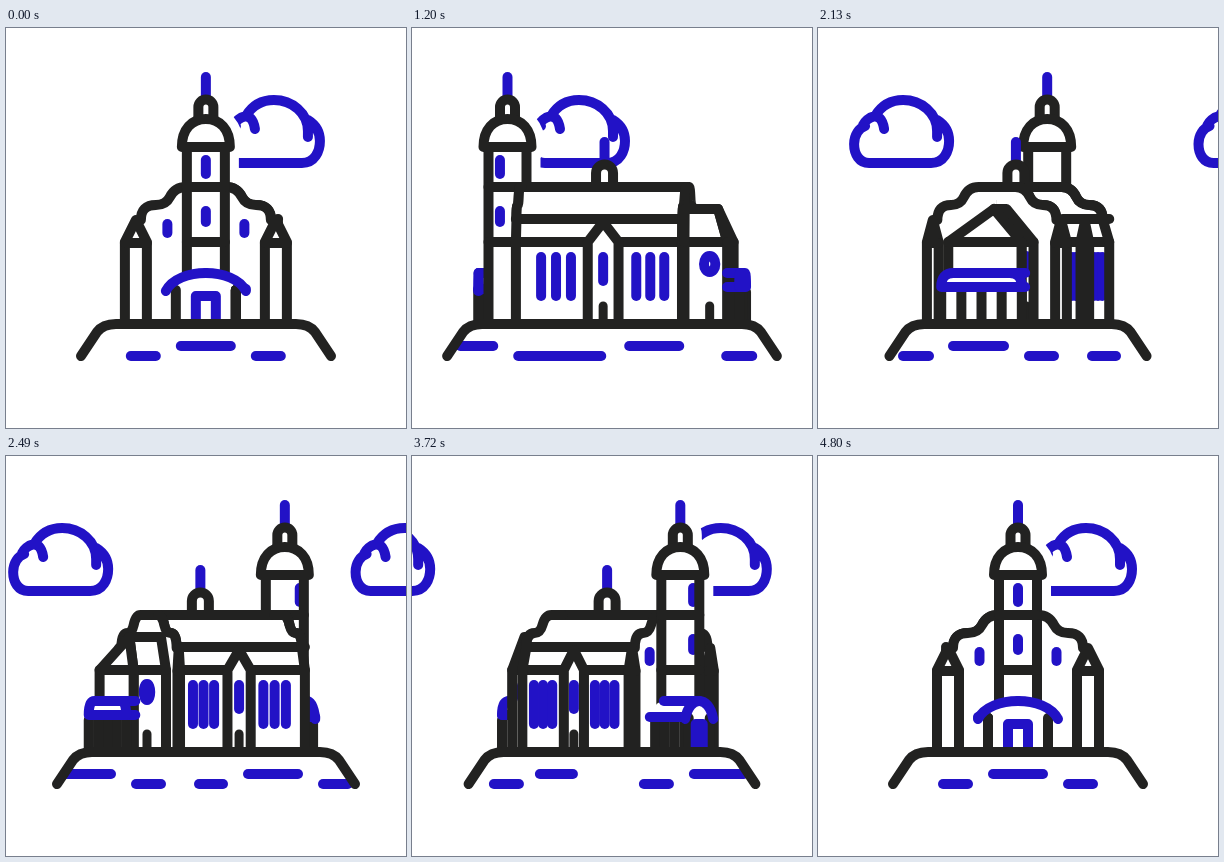
These frames come from a looping animation (400 by 400 pixels, 6.83 s). An HTML page with a canvas:

```html
<!DOCTYPE html>
<html lang="en">
<head>
<meta charset="utf-8">
<title>Turning church</title>
<style>
  html, body { margin: 0; width: 100%; height: 100%; overflow: hidden; background: #fff; }
  canvas { display: block; width: 400px; height: 400px; }
</style>
</head>
<body>
<canvas id="stage"></canvas>
<script>
const LOOP = 6830;
const INK = '#222221', BLUE = '#2212c6', WHITE = '#fff';
// Depths along the building's axis, and half widths
const FRONT = 97, BACK = -81, APSE = -127, PORCH = 143, PORCH_BASE = 85, REAR = -140;
const WALL = 72, APSE_W = 40, REAR_W = 44;

const canvas = document.getElementById('stage');
const dpr = window.devicePixelRatio || 1;
canvas.width = canvas.height = 400 * dpr;
const g = canvas.getContext('2d');

// State of the turn: cos, sin, width factors of body and porch, visible side
let c, s, w, v, side;
const px = (x, z) => 200 + x * w - z * s;
const porchX = (x, z) => 200 + x * v - z * s;

// Progress of the turn: time in ms, share done
const KEYS = [[0, 0], [630, 0.149], [1740, 0.449], [2490, 0.634], [3270, 0.805], [3720, 0.8855], [4800, 1]];

function slope(i) {
  const rate = j => (KEYS[j + 1][1] - KEYS[j][1]) / (KEYS[j + 1][0] - KEYS[j][0]);
  if (i === 0) return rate(0) * 0.9;
  if (i === KEYS.length - 1) return 0;
  const before = KEYS[i][0] - KEYS[i - 1][0], after = KEYS[i + 1][0] - KEYS[i][0];
  return (rate(i - 1) * after + rate(i) * before) / (before + after);
}

function progress(t) {
  const i = KEYS.findIndex(key => key[0] > t) - 1;
  if (i < 0) return 1;
  const [t0, a] = KEYS[i], [t1, b] = KEYS[i + 1];
  const d = t1 - t0, u = (t - t0) / d;
  return a + (b - a) * u * u * (3 - 2 * u) +
    d * (slope(i) * u * (1 - u) ** 2 - slope(i + 1) * u * u * (1 - u));
}

function stroke(color = INK, width = 10) {
  g.strokeStyle = color;
  g.lineWidth = width;
  g.stroke();
}

function fill(color = WHITE) {
  g.fillStyle = color;
  g.fill();
}

function trace(pts, close) {
  g.beginPath();
  pts.forEach(([x, y], i) => i ? g.lineTo(x, y) : g.moveTo(x, y));
  if (close) g.closePath();
}

function line(pts, color, width) {
  trace(pts);
  stroke(color, width);
}

function area(pts) {
  trace(pts, true);
  fill();
}

const post = (x, y1, y2, color, width) => line([[x, y1], [x, y2]], color, width);

// ---------- sky and ground ----------
const cloudPath = new Path2D(
  'M88 92C96 97 100 104 100 113C100 123 95 135 82 135H20C10 135 5 126 5 116C5 107 10 100 16 98' +
  'M14 97C17 90 32 80 35 101M26 88C32 78 42 72 54 72C72 72 88 85 88 103V109');

function cloud(x) {
  g.save();
  g.translate(x, 0);
  g.strokeStyle = BLUE;
  g.lineWidth = 10;
  g.stroke(cloudPath);
  g.restore();
}

// row, start, end
const DASHES = [
  [328, 125, 150], [318, 175, 225], [328, 250, 275], [318, 331, 364], [328, 389, 472],
  [318, 500, 550], [328, 597, 623], [318, 647, 698], [328, 723, 748], [328, 786, 810],
  [318, 835, 885], [328, 910, 935], [318, 956, 989], [328, 1060, 1085], [318, 1110, 1160],
  [328, 1185, 1210]
];

function ground(p) {
  const half = Math.hypot(125 * c, 170 * s);
  const l = 200 - half, r = 200 + half;
  const hill = new Path2D(
    `M${l} 328L${l + 16} 304Q${l + 22} 296 ${l + 35} 296H${r - 35}Q${r - 22} 296 ${r - 16} 304L${r} 328`);
  const inside = new Path2D(hill);
  inside.lineTo(r, 345);
  inside.lineTo(l, 345);
  g.save();
  g.clip(inside);
  for (const [y, a, b] of DASHES) {
    const x = a - 935 * p;
    if (x < 400 && x + b - a > 0) line([[x, y], [x + b - a, y]], BLUE);
  }
  g.restore();
  g.strokeStyle = INK;
  g.lineWidth = 10;
  g.stroke(hill);
}

// ---------- tower ----------
const domePath = new Path2D('M-24 119C-24 101 -14 91 0 91C14 91 24 101 24 119Z');
const lanternPath = new Path2D('M-7.5 89V79A7.5 7.5 0 0 1 7.5 79V89');
const shaftPath = new Path2D('M-19 119V292H19V119Z');

function onTower(draw) {
  g.save();
  g.translate(px(0, 112), 0);
  draw();
  g.restore();
}

function towerHalo() {
  onTower(() => {
    g.strokeStyle = g.fillStyle = WHITE;
    g.lineWidth = 28;
    for (const path of [domePath, lanternPath, shaftPath]) {
      g.stroke(path);
      g.fill(path);
    }
  });
}

function tower() {
  onTower(() => {
    post(0, 49, 68, BLUE);
    g.fillStyle = WHITE;
    g.fill(shaftPath);
    g.save();
    g.clip(shaftPath);
    // offset and facing of the front, right and left openings
    for (const [x, facing] of [[-21 * s, c], [21 * c, s], [-21 * c, -s]]) {
      if (facing < -0.01 || Math.abs(x) > 16) continue;
      post(x, 132, 146, BLUE);
      post(x, 183, 194, BLUE);
    }
    g.restore();
    post(-19, 119, 292);
    post(19, 119, 292);
    for (const y of [159, 214]) line([[-19, y], [19, y]]);
    g.strokeStyle = INK;
    g.fillStyle = WHITE;
    for (const path of [lanternPath, domePath]) {
      g.fill(path);
      g.stroke(path);
    }
  });
}

function ridgeTurret() {
  const x = 200 - 8 * Math.abs(s);
  post(x, 114, 132, BLUE);
  g.beginPath();
  g.moveTo(x - 8.5, 157);
  g.lineTo(x - 8.5, 145);
  g.arc(x, 145, 8.5, Math.PI, 0);
  g.lineTo(x + 8.5, 157);
  fill();
  stroke();
}

// ---------- walls and gables ----------
function halfGable(z, dir) {
  const at = x => px(x * dir, z);
  g.moveTo(at(0), 159);
  g.lineTo(at(20), 159);
  g.quadraticCurveTo(at(31), 159, at(36), 169);
  g.quadraticCurveTo(at(40), 177, at(50), 177);
  g.quadraticCurveTo(at(65), 177, at(65), 192);
}

function gable(z) {
  for (const dir of [-1, 1]) {
    g.beginPath();
    halfGable(z, dir);
    g.lineTo(px(65 * dir, z), 296);
    g.lineTo(px(0, z), 296);
    fill();
    g.beginPath();
    halfGable(z, dir);
    stroke();
  }
}

function pinnacle(x, hw) {
  const pts = [[x - hw, 296], [x - hw, 214], [x, 192], [x + hw, 214], [x + hw, 296]];
  area(pts);
  line(pts);
  line([[x - hw, 215], [x + hw, 215]]);
}

function pinnacles(z, hw) {
  for (const dir of [-side, side]) pinnacle(px(70 * dir, z), hw * w * w);
}

function facade() {
  gable(FRONT);
  if (c < 0) return;
  for (const x of [-38.5, 38.5]) post(px(x, FRONT), 196, 205, BLUE);
  pinnacles(FRONT, 11);
}

function nave() {
  const at = z => px(WALL * side, z);
  g.beginPath();
  halfGable(BACK, side);
  g.lineTo(at(BACK), 296);
  g.lineTo(at(FRONT), 296);
  g.lineTo(at(FRONT), 214);
  g.lineTo(px(65 * side, FRONT), 192);
  g.lineTo(px(0, FRONT), 159);
  fill();

  for (const z of [-62, -47, -32, 38, 54, 70]) post(at(z), 229, 268, BLUE);
  for (const y of [191, 214]) line([[at(FRONT), y], [at(BACK), y]]);
  line([[px(0, FRONT), 159], [px(0, BACK), 159]]);

  g.beginPath();
  halfGable(BACK, side);
  g.lineTo(at(BACK), 214);
  g.lineTo(at(BACK), 296);
  stroke();
  if (c < 0) {
    g.beginPath();
    halfGable(FRONT, side);
    g.lineTo(at(FRONT), 214);
    g.lineTo(at(FRONT), 296);
    stroke();
  }

  const bay = [[at(-13), 296], [at(-13), 214], [at(3.5), 194], [at(20), 214], [at(20), 296]];
  area(bay);
  post(at(3.5), 229, 253, BLUE);
  post(at(3.5), 278, 296, INK, 9);
  line(bay);
}

// ---------- apse ----------
function apse() {
  const near = px(APSE_W * side, APSE), far = px(-APSE_W * side, APSE);
  const join = px(APSE_W * side, BACK);
  const peak = px((20 + 14 * c) * side, -115);
  const roofEnd = px(APSE_W * side * Math.abs(s), BACK);

  area([[near, 296], [near, 214], [peak, 181], [roofEnd, 181], [join, 214], [join, 296]]);
  const mid = px(APSE_W * side, -108);
  g.beginPath();
  g.ellipse(mid, 236, 6.5 * s * s, 8, 0, 0, 7);
  stroke(BLUE);
  post(mid, 278, 296, INK, 9);
  line([[join, 296], [join, 214], [near, 214]]);
  line([[join, 214], [roofEnd, 181], [peak, 181], [near, 214], [near, 296]]);

  if (c < 0) {
    const back = [[far, 296], [far, 214], [peak, 181], [near, 214], [near, 296]];
    area(back);
    line(back);
    line([[far, 214], [near, 214]]);
  }
}

// ---------- porches ----------
function arch(z) {
  g.beginPath();
  g.moveTo(porchX(-40, z), 263);
  g.bezierCurveTo(porchX(-28, z), 239, porchX(28, z), 239, porchX(40, z), 263);
}

function frontPorch() {
  for (const z of [PORCH_BASE, PORCH]) {
    arch(z);
    g.lineTo(porchX(34, z), 296);
    g.lineTo(porchX(-34, z), 296);
    fill();
  }
  const a = porchX(0, PORCH_BASE), b = porchX(0, PORCH);
  area([[a, 245], [b, 245], [b, 296], [a, 296]]);

  for (const z of [88, 104, 120, 136]) post(porchX(30 * side, z), 262, 296);
  for (const x of [-30, 30]) post(porchX(x, PORCH), 262, 296);
  if (c > 0) {
    const l = porchX(-10, PORCH), r = porchX(10, PORCH);
    line([[l, 291], [l, 268], [r, 268], [r, 291]], BLUE);
  }
  line([[a, 245], [b, 245]], BLUE);
  line([[porchX(40 * side, PORCH_BASE), 261], [porchX(40 * side, PORCH), 261]], BLUE);
  arch(PORCH);
  stroke(BLUE);
}

function rearPorch() {
  const at = x => px(x * REAR_W, REAR);
  area([[at(-1), 250], [at(1), 250], [at(1), 296], [at(-1), 296]]);
  for (const x of [-1, -0.5, 0, 0.5, 1]) post(at(x), 264, 296);
  const edge = px(REAR_W * side, APSE);
  line([[at(0.7 * side), 245], [edge, 245]], BLUE);
  line([[at(side), 259], [edge, 259]], BLUE);
  g.beginPath();
  g.moveTo(at(-1), 259);
  g.quadraticCurveTo(at(-1), 245, at(-0.7), 245);
  g.lineTo(at(0.7), 245);
  g.quadraticCurveTo(at(1), 245, at(1), 259);
  g.closePath();
  fill();
  stroke(BLUE);
}

function draw(t) {
  const p = progress(t);
  const turn = p * 2 * Math.PI;
  const angle = turn - 0.063 * Math.sin(2 * turn);
  c = Math.cos(angle);
  s = Math.sin(angle);
  w = Math.sign(c) * Math.abs(c) ** 2.5;
  v = Math.sign(c) * Math.abs(c) ** 4.5;
  side = s > 0 ? 1 : -1;

  g.setTransform(dpr, 0, 0, dpr, 0, 0);
  g.fillStyle = WHITE;
  g.fillRect(0, 0, 400, 400);
  g.lineCap = g.lineJoin = 'round';

  cloud(214 - 334 * p);
  cloud(214 + 357 * (1 - p));
  towerHalo();

  if (c > 0) {
    rearPorch();
    apse();
    ridgeTurret();
    nave();
    facade();
    tower();
    frontPorch();
  } else {
    frontPorch();
    tower();
    facade();
    ridgeTurret();
    nave();
    gable(BACK);
    pinnacles(BACK, 7);
    apse();
    rearPorch();
  }
  ground(p);
}

function tick() {
  draw(performance.now() % LOOP);
  requestAnimationFrame(tick);
}
tick();
</script>
</body>
</html>
```
